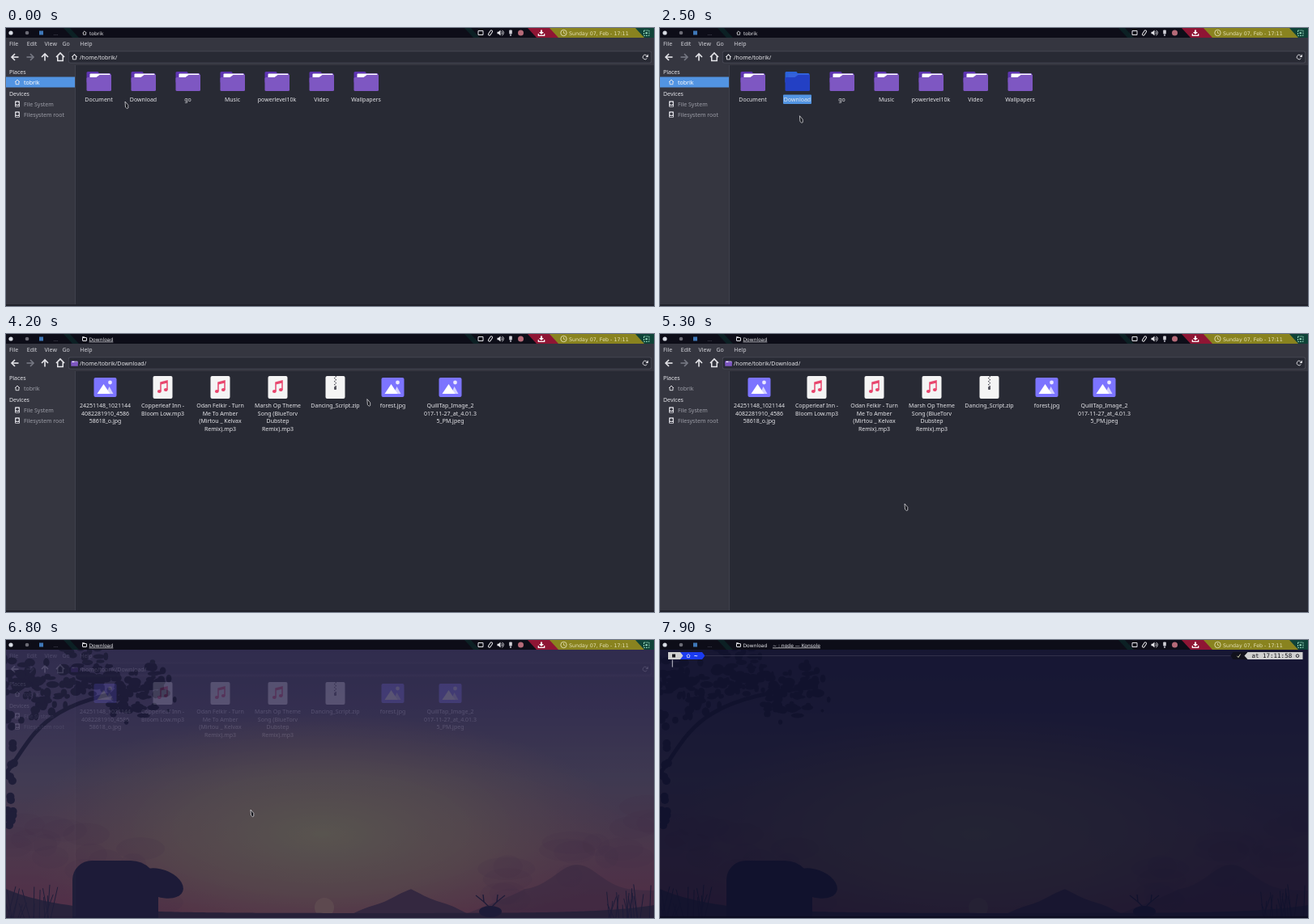
An HTML page with a canvas for the animation above (8000 ms loop, 800 px wide and 344 px high).

```html
<!DOCTYPE html>
<html lang="en">
<head>
<meta charset="utf-8">
<title>File manager and terminal</title>
<style>
  html, body { margin: 0; width: 100%; height: 100%; overflow: hidden; background: #282a36; }
  canvas { display: block; width: 100%; height: 100%; }
</style>
</head>
<body>
<canvas id="stage" width="800" height="344"></canvas>
<script>
const W = 800, H = 344, LOOP = 8000, STEP = 100, BAR_H = 12;
const SELECT = 1200, OPEN = 3000, FADE = 6700, TERMINAL = 6900, RUN = 7300, REDRAW = 7700;
const UI = '7px "Noto Sans", sans-serif';
const TITLE = '6px "DejaVu Sans", sans-serif';
const MONO = '7.5px "DejaVu Sans Mono", monospace';
const USER = 'tobrik';
const BLUE = '#5294e2', PANEL = '#353640', VIEW = '#282a34', LIGHT = '#e6e6ea', DIM = '#9c9da6';
const PURPLE = '#7e57c2', PINK = '#e8446c', PLATE = '#d0d0d0', INK = '#16161c';
const SHADE = 'rgba(14,16,41,.88)';

const stage = document.getElementById('stage').getContext('2d');
let c = stage;

// Drawing helpers
function rect(x, y, w, h, color, r = 0) {
  c.fillStyle = color;
  c.beginPath();
  c.roundRect(x, y, w, h, r);
  c.fill();
}
function frameRect(x, y, w, h, color, r = 0) {
  c.strokeStyle = color;
  c.lineWidth = 1;
  c.beginPath();
  c.roundRect(x, y, w, h, r);
  c.stroke();
}
function trace(points) {
  c.beginPath();
  for (let i = 0; i < points.length; i += 2) c.lineTo(points[i], points[i + 1]);
}
function poly(points, color) {
  trace(points);
  c.fillStyle = color;
  c.fill();
}
function line(points, color, width = 1) {
  trace(points);
  c.strokeStyle = color;
  c.lineWidth = width;
  c.stroke();
}
function disc(x, y, rx, color, ry = rx) {
  c.fillStyle = color;
  c.beginPath();
  c.ellipse(x, y, rx, ry, 0, 0, 7);
  c.fill();
}
function ring(x, y, r, color, from = 0, to = 6.3) {
  c.strokeStyle = color;
  c.lineWidth = .9;
  c.beginPath();
  c.arc(x, y, r, from, to);
  c.stroke();
}
function text(s, x, y, color = LIGHT, font = UI, align = 'left') {
  c.font = font;
  c.fillStyle = color;
  c.textAlign = align;
  c.fillText(s, x, y);
}
function at(x, y, draw, scale = 1, angle = 0) {
  c.save();
  c.translate(x, y);
  c.rotate(angle);
  c.scale(scale, scale);
  draw();
  c.restore();
}

// Sunset wallpaper, painted once
function paintWallpaper() {
  const canvas = document.createElement('canvas');
  canvas.width = W;
  canvas.height = H;
  c = canvas.getContext('2d');
  let seed = 11;
  const random = () => (seed = seed * 16807 % 2147483647) / 2147483647;
  const spread = size => (random() + random() - 1) * size;
  const dark = '#29224a';

  const sky = c.createLinearGradient(0, 0, 0, H);
  ['#54477c', '#66558a', '#82708c', '#a0687c', '#b04c6c'].forEach((color, i) => sky.addColorStop(i / 4, color));
  rect(0, 0, W, H, sky);
  const glow = c.createRadialGradient(0, 0, 0, 0, 0, 150);
  glow.addColorStop(0, 'rgba(200,190,135,.9)');
  glow.addColorStop(.5, 'rgba(200,170,130,.6)');
  glow.addColorStop(1, 'rgba(200,140,125,0)');
  c.save();
  c.translate(390, 240);
  c.scale(2.5, 1);
  rect(-160, -150, 320, 300, glow);
  c.restore();

  for (let i = 0; i < 36; i++) {
    const edge = random() * 190;
    disc(i % 2 ? edge : W - edge, 200 + edge * .35 + random() * 60, 14 + random() * 24, 'rgba(125,75,110,.14)', 14);
  }

  function ridge(height, color) {
    c.fillStyle = color;
    c.beginPath();
    c.moveTo(0, H);
    for (let x = 0; x <= W; x += 4) c.lineTo(x, height(x));
    c.lineTo(W, H);
    c.fill();
  }
  disc(393, 331, 12, '#d09a88');
  ridge(x => 310 - 32 * Math.exp(-(((x - 705) / 38) ** 2)) + Math.max(0, 640 - x) * .4, 'rgba(105,65,95,.5)');
  ridge(x => 309 + Math.abs(x - 500) * .42 + Math.sin(x / 9), '#64425f');
  ridge(x => 338 - 30 * Math.exp(-x / 70) - 10 * Math.exp((x - W) / 60), '#44304f');

  // Branch with clusters of leaves
  c.strokeStyle = dark;
  c.lineWidth = 5;
  c.beginPath();
  c.moveTo(0, 165);
  c.bezierCurveTo(35, 120, 40, 70, 195, 58);
  c.stroke();
  for (let i = 0; i < 230; i++) {
    const u = i % 6 / 5;
    disc(12 + u * 168 + spread(30), 52 + 20 * Math.sin(u * 9) + spread(38), 2 + random() * 6, dark, 2 + random() * 4);
  }
  for (let i = 0; i < 20; i++) disc(random() * 10, 90 + random() * 155, 5, dark, 5);
  for (let i = 0; i < 36; i++) {
    const x = i % 2 ? random() * 60 : 738 + random() * 62;
    line([x, H, x + spread(12), 302 + random() * 26], dark);
  }

  // Bear and deer
  rect(82, 273, 106, 100, dark, [24, 34, 0, 0]);
  at(191, 301, () => disc(0, 0, 29, dark, 17), 1, .35);
  disc(598, 336, 14, dark, 7);
  for (const side of [-1, 1]) {
    line([598, 332, 598 + side * 8, 324, 598 + side * 9, 315], dark, 1.4);
    line([598 + side * 8, 324, 598 + side * 18, 316], dark, 1.2);
  }
  c = stage;
  return canvas;
}
const wallpaper = paintWallpaper();

// Icons, drawn around their centre
function house(x, y, scale, color) {
  at(x, y, () => {
    line([-4, 0, 0, -4, 4, 0], color, 1.3);
    line([-2.6, -1, -2.6, 3.6, 2.6, 3.6, 2.6, -1], color, 1.2);
  }, scale);
}
function arrow(x, angle, color) {
  at(x, 36, () => {
    line([4.5, 0, -4, 0], color, 1.6);
    line([0, -4, -4, 0, 0, 4], color, 1.6);
  }, 1, angle);
}
function folderIcon(selected) {
  const [back, paper, front] = selected ? ['#2b62d8', '#3562dc', '#2340c4'] : ['#5e35b1', '#ffffff', PURPLE];
  rect(-15, -12, 15, 14, back, 1.5);
  rect(-13, -10, 28, 12, back, 1.5);
  rect(-11, -9.5, 25, 9, paper, 1);
  rect(-15, -5, 30.5, 17, front, 1.5);
  poly([-3, -5, 1, -8, 15.5, -8, 15.5, -3], front);
}
function imageIcon() {
  rect(-14, -12, 28, 24, '#7c74ff', 2);
  poly([1, 8, 5, -1, 10, 8], '#d6d3ff');
  poly([-10, 8, -2, -4, 6, 8], '#ffffff');
  disc(6, -6, 2.4, '#e9e7ff');
}
function page() {
  rect(-12, -14, 24, 28, '#f4f4f4', 2);
}
function musicIcon() {
  page();
  line([-2.5, 5, -2.5, -6, 5.5, -8, 5.5, 3], PINK, 1.5);
  line([-2.5, -4.5, 5.5, -6.5], PINK, 2);
  for (const x of [-4.2, 3.8]) disc(x, 4 - x / 4, 2.4, PINK, 2);
}
function zipIcon() {
  page();
  for (let i = 0; i < 7; i++) rect(i % 2 ? -1.5 : 0, i * 2 - 14, 1.5, 1.2, '#55555e');
  rect(-1.5, -1, 3, 4, '#55555e', 1);
}

const folders = ['Document', 'Download', 'go', 'Music', 'powerlevel10k', 'Video', 'Wallpapers'];
const files = [
  [imageIcon, '24251148_1021144', '4082281910_4586', '58618_o.jpg'],
  [musicIcon, 'Copperleaf Inn -', 'Bloom Low.mp3'],
  [musicIcon, 'Odan Felkir - Turn', 'Me To Amber', '(Mirtou _ Kelvax', 'Remix).mp3'],
  [musicIcon, 'Marsh Op Theme', 'Song (BlueTorv', 'Dubstep', 'Remix).mp3'],
  [zipIcon, 'Dancing_Script.zip'],
  [imageIcon, 'forest.jpg'],
  [imageIcon, 'QuillTap_Image_2', '017-11-27_at_4.01.3', '5_PM.jpeg'],
];

// Pointer stops (time, x, y), eased in between
const stops = [
  [0, 147, 91], [900, 180, 72], [1500, 167, 92], [2200, 172, 121], [3200, 174, 64], [3400, 195, 158],
  [3600, 94, 88], [4500, 569, 78], [4800, 143, 105], [4900, 300, 209], [5300, 302, 210], [LOOP, 302, 210],
];
function pointerAt(t) {
  const i = stops.findIndex(stop => stop[0] > t);
  const [t0, x0, y0] = stops[i - 1], [t1, x1, y1] = stops[i];
  const u = (t - t0) / (t1 - t0), k = u * u * (3 - 2 * u);
  return [x0 + (x1 - x0) * k, y0 + (y1 - y0) * k];
}
function drawPointer([x, y]) {
  at(x, y, () => {
    const shape = [0, 0, 3.8, 4.4, 3.8, 8, 2.4, 8.6, .5, 7, 0, 0];
    poly(shape, '#15161c');
    line(shape, '#d8d8dc', .8);
  });
}

function drawToolbar(home) {
  ['File', 'Edit', 'View', 'Go', 'Help'].forEach((name, i) => text(name, 4 + i * 21.8, 22, '#d2d2d8'));
  arrow(11, 0, LIGHT);
  arrow(30, Math.PI, '#777984');
  arrow(48, Math.PI / 2, LIGHT);
  house(67, 36, 1.25, LIGHT);
  rect(77, 28.5, 720, 15, '#484a56', 2);
  rect(77.7, 29.2, 718.6, 13.6, VIEW, 2);
  if (home) house(84.5, 36, .8, LIGHT);
  else at(84.5, 36.5, () => folderIcon(false), .28);
  text(`/home/${USER}/${home ? '' : 'Download/'}`, 91, 38.5);
  ring(789, 36, 2.8, LIGHT, .5, 5.6);
  poly([792.8, 32.5, 792.8, 36, 789.5, 36], LIGHT);
}

function drawSidebar(home) {
  rect(85, 46, 1, H, '#3f414c');
  text('Places', 4, 56.5, LIGHT, '500 ' + UI);
  if (home) rect(0, 60.5, 85, 13, BLUE);
  house(14, 67, .75, LIGHT);
  text(USER, 22, 69.5, home ? '#ffffff' : DIM);
  text('Devices', 4, 83.5, LIGHT, '500 ' + UI);
  ['File System', 'Filesystem root'].forEach((name, i) => {
    const y = 94 + i * 13;
    rect(11, y - 3.8, 6, 7.6, '#d4d4da', 1);
    disc(14, y - .8, 1.8, PANEL);
    rect(12, y + 2, 4, 1, PANEL);
    text(name, 22, y + 2.8, DIM);
  });
}

function drawItem(x, [px, py], draw, lines) {
  const hovered = Math.abs(px - x) < 17 && py > 53 && py < 94;
  at(x, 66, () => {
    c.filter = hovered ? 'brightness(1.12)' : 'none';
    draw();
  });
  lines.forEach((s, row) => text(s, x, 91 + row * 9.5, LIGHT, UI, 'center'));
}

function drawFileManager(t, pointer) {
  const home = t < OPEN;
  rect(0, BAR_H, W, H, PANEL);
  rect(86, 46, W, H, VIEW);
  drawToolbar(home);
  drawSidebar(home);
  if (home) {
    folders.forEach((name, i) => {
      const x = 114.5 + i * 55, selected = name === 'Download' && t >= SELECT;
      if (selected) rect(152, 82.5, 35, 11.5, BLUE, 1);
      drawItem(x, pointer, () => folderIcon(selected), [name]);
    });
  } else {
    files.forEach(([draw, ...lines], i) => drawItem(122.5 + i * 71, pointer, draw, lines));
  }
  rect(0, 342, W, 2, '#20212a');
}

// Prompt segment; each end bulges outward (+) or is notched (-)
function segment(left, right, leftTip, rightTip, color) {
  poly([left, 15, right, 15, right + rightTip, 19.5, right, 24, left, 24, left - leftTip, 19.5], color);
}
function drawPrompt(right, time) {
  rect(56, 19.2, right - 143, .7, '#3a3850');
  segment(25, 52, 0, 3.5, '#1b3bf0');
  segment(10, 25, 0, 3.5, PLATE);
  rect(15, 17.5, 4, 4, INK);
  house(35, 19.6, .55, '#ffffff');
  text('~', 42, 22, '#ffffff', 'bold ' + MONO);
  segment(right - 86, right - 68, 3, 0, '#11111c');
  segment(right - 68, right, 4, 0, PLATE);
  line([right - 81, 19.8, right - 79.5, 21.5, right - 77, 17.5], '#d5d5b0');
  text('at ' + time, right - 63, 22.2, INK, MONO);
  ring(right - 6.5, 19.6, 1.8, INK);
  rect(14.8, 24.5, 1, 9, '#c4c4d0');
}
function drawTerminal(t) {
  c.drawImage(wallpaper, 0, 0);
  rect(0, BAR_H, W, H, SHADE);
  if (t < REDRAW) drawPrompt(492, '17:11:57');
  else drawPrompt(793.5, '17:11:58');
  rect(0, 342, W, 2, 'rgba(8,8,24,.6)');
}

function drawTitle(s, x, active) {
  text(s, x, 8.5, LIGHT, TITLE);
  if (active) rect(x, 9.6, c.measureText(s).width, .7, LIGHT);
}
function slant(left, right, color) {
  poly([left, 0, right, 0, right + 11, BAR_H, left + 11, BAR_H], color);
}
function drawTopBar(t) {
  rect(0, 0, W, BAR_H, '#0d0d18');
  slant(71, 79, '#0c2024');
  slant(566, 574, '#0c2024');
  disc(6, 6, 2.6, '#d8dce4');
  disc(26, 6, 2.3, '#6c6c76');
  rect(41, 3.5, 5, 5, '#3f78b8');
  text('...', 58.5, 8.5, '#7c7c88', TITLE);

  if (t < OPEN) {
    house(97, 6.2, .6, LIGHT);
    drawTitle(USER, 103, false);
  } else {
    frameRect(94.5, 4.5, 5, 4, LIGHT, .5);
    rect(94, 3.3, 3, 1.2, LIGHT);
    drawTitle('Download', 102.5, t < TERMINAL);
    if (t >= TERMINAL) drawTitle(`~ : ${t < RUN ? 'zsh' : 'node'} — Konsole`, 139, true);
  }

  // Tray
  frameRect(583, 3.5, 6, 5, LIGHT);
  at(598, 6, () => frameRect(-1.4, -3.5, 2.8, 7, LIGHT, 1.4), 1, .6);
  poly([606.5, 4.8, 608, 4.8, 610.5, 2.5, 610.5, 9.5, 608, 7.2, 606.5, 7.2], LIGHT);
  for (const r of [2, 3.8]) ring(610.5, 6, r, LIGHT, -1, 1);
  rect(621.2, 2.5, 3.6, 5, '#cfcfd6', .8);
  rect(622, 7.5, 2, 2.5, '#8c8c98');
  disc(635.5, 6, 3.5, '#b56a78');

  slant(644, 672, '#8f1534');
  slant(671, 778, '#89831f');
  slant(777, W, '#0f4338');
  rect(660, 2.5, 2, 3, '#ffffff');
  poly([658, 5, 664, 5, 661, 8], '#ffffff');
  line([657.3, 7, 657.3, 9.3, 664.7, 9.3, 664.7, 7], '#ffffff', 1.2);
  ring(688.5, 6, 3.7, '#e4e0b4');
  line([688.5, 3.8, 688.5, 6.2, 690.3, 7], '#e4e0b4', .8);
  text('Sunday 07, Feb - 17:11', 695, 8.5, '#e4e0b4', TITLE.replace('6px', '6.35px'));
  c.setLineDash([2, 1]);
  frameRect(787.5, 3, 6.5, 6.5, '#8fd0b4');
  c.setLineDash([]);
  disc(790.7, 6.2, 1.3, '#8fd0b4');
}

function drawIBeam(x, y) {
  rect(x - .5, y - 3.5, 1, 7, LIGHT);
  for (const end of [-4, 3]) rect(x - 2, y + end, 4, 1, LIGHT);
}

function frame(now) {
  // The desktop updates ten times per second
  const t = Math.floor(now % LOOP / STEP) * STEP;
  const pointer = pointerAt(t);
  if (t < TERMINAL) {
    drawFileManager(t, pointer);
    if (t >= FADE) {
      c.globalAlpha = .35 + (t - FADE) / 300;
      c.drawImage(wallpaper, 0, 0);
      c.globalAlpha = (t - FADE) / 200;
      rect(0, BAR_H, W, H, SHADE);
      c.globalAlpha = 1;
    }
    drawPointer(pointer);
  } else {
    drawTerminal(t);
    if (t < 7600) drawIBeam(301.5, 209.5);
  }
  drawTopBar(t);
  requestAnimationFrame(frame);
}
requestAnimationFrame(frame);
</script>
</body>
</html>
```
